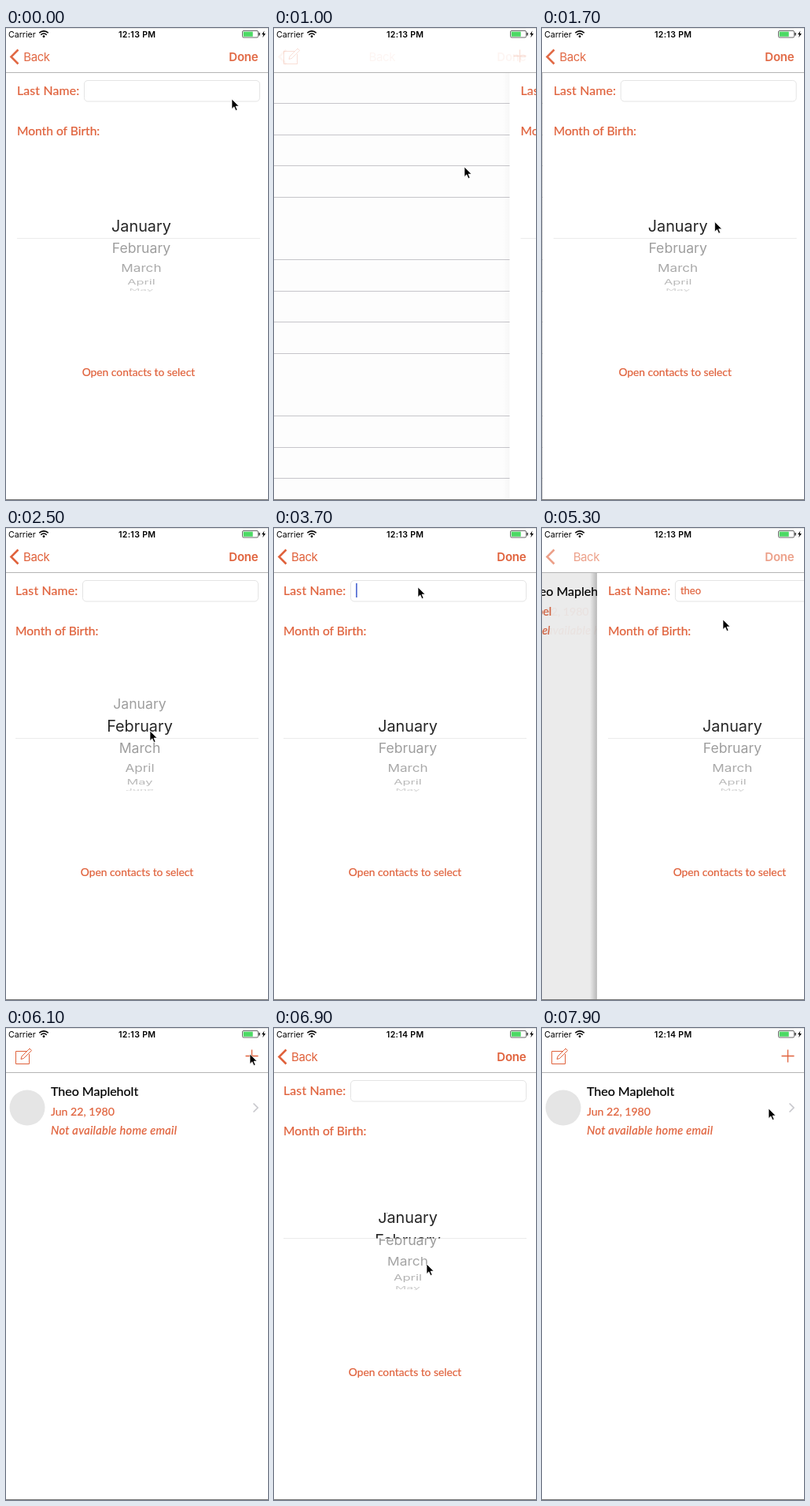
These frames come from a looping animation (333 px wide and 598 px high, 8000 ms). An HTML page:

```html
<!DOCTYPE html>
<html lang="en">
<head>
<meta charset="utf-8">
<title>Contact picker</title>
<style>
html, body { margin: 0; width: 100%; height: 100%; overflow: hidden; background: #fff; }
svg { display: block; width: 333px; height: 598px; color: #e0623c; --p: 0; --s: 0; }
text { font-family: Inter, "Open Sans", sans-serif; fill: currentColor; white-space: pre; }
.geo { font-family: Lato, "Open Sans", sans-serif; stroke: currentColor; stroke-width: .22px; }
.line { fill: none; stroke: currentColor; }
.ink { color: #000; }

/* --p: 0 = form on screen, 1 = list on screen */
#list { transform: translateX(calc((var(--p) - 1) * 100px)); }
#dim { opacity: calc((1 - var(--p)) * .1); }
#form { transform: translateX(calc(var(--p) * 333px)); }
#shade { opacity: calc(1 - var(--p)); }
#formNav { opacity: calc(1 - pow(var(--p), .6)); }
#back { transform: translateX(calc(pow(var(--p), 1.2) * 111px)); }
#listNav { opacity: pow(var(--p), 16); }

/* --s: month in the middle of the wheel */
#wheel text {
  --a: calc((var(--i) - var(--s)) * 20deg);
  font-size: 17.8px; fill: #9a9a9a; text-anchor: middle;
  opacity: calc(.35 + .65 * cos(var(--a)));
  transform: translateY(calc(82px * sin(var(--a)))) scale(calc(.84 + .16 * cos(var(--a))), max(0, cos(var(--a))));
}
#band text {
  font-size: 19.8px; fill: #262626; text-anchor: middle;
  transform: translateY(calc((var(--i) - var(--s)) * 29px));
}
</style>
</head>
<body>
<svg id="stage" viewBox="0 0 333 598">
  <defs>
    <clipPath id="outer"><path d="M-170 -90H170V-16H-170ZM-170 15.5H170V83H-170Z"/></clipPath>
    <clipPath id="inner"><path d="M-170 -17H170V15.5H-170Z"/></clipPath>
    <linearGradient id="fade"><stop offset="0" stop-opacity="0"/><stop offset="1" stop-opacity=".28"/></linearGradient>
  </defs>
  <rect width="333" height="598" fill="#fff"/>

  <g id="list">
    <g id="rows" class="line" style="color:#c8c7cc"></g>
    <g id="cell">
      <circle cx="27" cy="101" r="22.5" fill="#e5e5e5"/>
      <text class="geo ink" x="57" y="85.5" font-size="16">Theo Mapleholt</text>
      <g id="blank">
        <text class="geo" x="57" y="111" font-size="14.4">Label</text>
        <text class="geo" x="57" y="135" font-size="14.4" font-style="italic">Label</text>
      </g>
      <g id="info">
        <text class="geo" x="57" y="111" font-size="14.1">Jun 22, 1980</text>
        <text class="geo" x="57" y="135" font-size="14.6" letter-spacing=".3" font-style="italic">Not available home email</text>
      </g>
      <path class="line" style="color:#c7c7cc" stroke-width="1.6" d="M314.5 95.5L320 101L314.5 106.5"/>
    </g>
  </g>
  <rect id="dim" width="333" height="598"/>

  <g id="form">
    <rect id="shade" x="-11" y="57" width="9" height="541" fill="url(#fade)"/>
    <rect x="-2" width="336" height="598" fill="#fff"/>
    <text class="geo" x="12" y="85" font-size="15.8" letter-spacing=".2">Last Name:</text>
    <rect x="97.5" y="66.5" width="223" height="26.5" rx="4.5" fill="#fff" stroke="#e4e4e4"/>
    <text id="entry" class="geo" x="104" y="84" font-size="13"></text>
    <rect id="caret" x="104" y="70" width="1.8" height="18" fill="#5b74d6"/>
    <text class="geo" x="12" y="136" font-size="15.6">Month of Birth:</text>
    <path class="line" style="color:#ebebeb" d="M12 266.5H321"/>
    <g transform="translate(170 251)">
      <g id="wheel" clip-path="url(#outer)"></g>
      <g id="band" clip-path="url(#inner)"></g>
    </g>
    <text class="geo" x="166.5" y="440.5" font-size="13.8" text-anchor="middle">Open contacts to select</text>
  </g>

  <rect width="333" height="56" fill="#fff"/>
  <path class="line" style="color:#b4b4b4" d="M0 56.5H333"/>
  <g id="formNav">
    <path class="line" stroke-width="2.6" d="M15.5 27.5L6.5 36.5L15.5 45.5"/>
    <text id="back" x="22" y="42" font-size="15" letter-spacing="-.4">Back</text>
    <text x="320.5" y="42" font-size="15" font-weight="600" letter-spacing="-.2" text-anchor="end">Done</text>
  </g>
  <g id="listNav" class="line">
    <path d="M26 29.5H12.5V45.5H29.5V33M19 39.5L20 36L30 26L32.5 28.5L22.5 38.5Z"/>
    <path stroke-width="1.3" d="M304.5 35.5H320.5M312.5 27.5V43.5"/>
  </g>

  <g class="ink">
    <text x="3" y="12" font-size="10.6">Carrier</text>
    <path class="line" stroke-width="1.6" d="M42.3 6.3a8 8 0 0 1 11.4 0M44.3 8.7a5 5 0 0 1 7.4 0"/>
    <circle cx="48" cy="10.7" r="1.4"/>
    <text id="hour" x="166.7" y="12" font-size="10.6" font-weight="600" letter-spacing=".3" text-anchor="middle"></text>
    <rect x="300.5" y="3.5" width="20" height="8.5" rx="1.5" fill="none" stroke="#444" stroke-width=".8"/>
    <rect x="301.7" y="4.7" width="12" height="6.1" fill="#4cd964"/>
    <path d="M321.5 6h1.2v3.5h-1.2ZM328.5 3.5l-3.5 4.8h2.2l-1 4 3.7-5.2h-2.3z"/>
  </g>
  <path class="line" style="color:#c4c4c4" stroke-width=".6" d="M0 .3H333"/>
  <path class="line" style="color:#777" d="M0 597.5H333"/>

  <path id="cursor" stroke="#fff" stroke-width=".7" d="M0 0V12.5L2.9 9.8L5 14.6L7 13.7L5 9.1H9Z"/>
</svg>
<script>
const LOOP = 8000, TICK = 100;
const $ = id => document.getElementById(id);
const clamp = u => Math.min(1, Math.max(0, u));
const ease = (t, start, span) => {
  const u = clamp((t - start) / span);
  return u * u * (3 - 2 * u);
};

function add(parent, tag, attrs, text = "") {
  const el = document.createElementNS("http://www.w3.org/2000/svg", tag);
  for (const key in attrs) el.setAttribute(key, attrs[key]);
  el.textContent = text;
  $(parent).append(el);
}

const months = ["January", "February", "March", "April", "May", "June", "July",
  "August", "September", "October", "November", "December"];
months.forEach((name, i) => {
  add("wheel", "text", { y: 6.4, style: `--i:${i}` }, name);
  add("band", "text", { y: 7.2, style: `--i:${i}` }, name);
});
for (let i = 1; i < 14; i++) {
  if (i % 5) add("rows", "path", { d: `M0 ${Math.floor(56 + 39.6 * i) + .5}H333` });
}

// The form glides in slowly and leaves fast
const enter = u => (1 - clamp(u / 500)) ** 3;
const leave = u => ease(u, 0, 100);
const slides = [[-410, enter], [919, leave], [1300, enter], [5270, leave], [6300, enter], [7600, leave]];
function page(t) {
  const [start, move] = slides.findLast(([ms]) => ms <= t);
  return move(t - start);
}

const month = t => ease(t, 1900, 400) - ease(t, 2500, 500) + 5 * ease(t, 6800, 600);

// Pointer stops: [ms, place]
const done = [301, 33], plus = [310, 33], field = [183, 75], pick = [183, 257];
const stops = [
  [0, [287, 90]], [800, done], [900, done], [1000, [242, 176]], [1300, plus],
  [1900, [188, 320]], [2300, pick], [2500, pick], [3200, field], [4500, field],
  [5000, done], [5200, done], [5300, [230, 116]], [6000, plus], [6300, plus],
  [6900, [194, 299]], [7500, done], [7600, done], [7900, [288, 102]]
];
function pointer(t) {
  const i = stops.findLastIndex(([ms]) => ms <= t);
  const [start, from] = stops[i];
  const [end, to] = stops[i + 1] || [LOOP, from];
  const u = ease(t, start, end - start);
  return from.map((v, k) => v + (to[k] - v) * u);
}

function draw(t) {
  const [x, y] = pointer(t);
  $("cursor").setAttribute("transform", `translate(${x} ${y})`);
  $("stage").style.setProperty("--p", page(t));
  $("stage").style.setProperty("--s", month(t));

  const typed = t < 5500 ? Math.max(0, Math.floor((t - 3800) / 170) + 1) : 0;
  $("entry").textContent = "theo".slice(0, typed);
  $("caret").setAttribute("x", 104 + $("entry").getComputedTextLength());
  $("caret").style.opacity = +(t >= 3400 && t < 5100);

  const found = t >= 5200, filled = ease(t, 5270, 200);
  $("rows").style.opacity = +!found;
  $("cell").style.opacity = +found;
  $("blank").style.opacity = 1 - filled;
  $("info").style.opacity = filled;
  $("hour").textContent = t < 6400 ? "12:13 PM" : "12:14 PM";
}

let origin;
function frame(now) {
  origin ??= now;
  draw(Math.floor((now - origin + 40) / TICK) * TICK % LOOP);
  requestAnimationFrame(frame);
}
draw(0);
requestAnimationFrame(frame);
</script>
</body>
</html>
```
